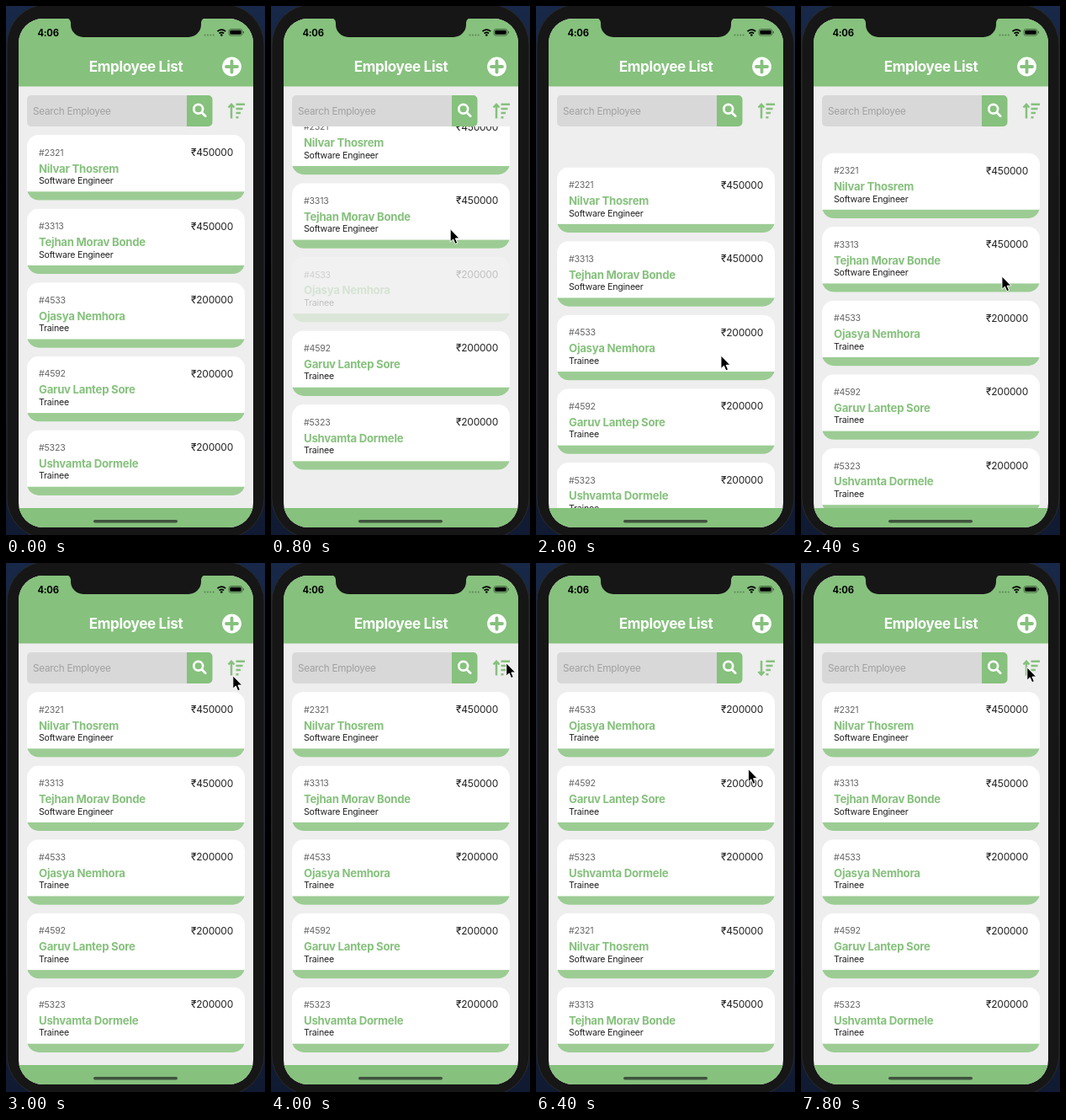
Write an HTML page that moves like this. It is 308 px wide and 628 px high and loops after 8000 ms.

```html
<!DOCTYPE html>
<html lang="en">
<head>
<meta charset="utf-8">
<title>Employee list</title>
<style>
  html, body { margin: 0; width: 100%; height: 100%; overflow: hidden; background: #141d33; }
  svg { display: block; width: 100%; height: 100%; }
  text { font-family: Inter, "Noto Sans", sans-serif; letter-spacing: -.02em; }
  .green { fill: #86c17d; }
  .title { font-size: 17.1px; font-weight: 700; fill: #fff; text-anchor: middle; }
  .time { font-size: 11.2px; font-weight: 700; }
  .hint { font-size: 11.7px; fill: #a0a0a0; }
  .id { font-size: 10.6px; fill: #666; }
  .name { font-size: 13.2px; font-weight: 700; fill: #86c17d; }
  .role { font-size: 10.6px; fill: #222; }
  .pay { font-size: 12px; fill: #222; text-anchor: end; }
</style>
</head>
<body>
<svg viewBox="0 0 308 628">
  <defs>
    <linearGradient id="wall" x2="0" y2="1">
      <stop stop-color="#172848"/><stop offset="1" stop-color="#101b33"/>
    </linearGradient>
    <clipPath id="screen"><rect x="15" y="15" width="279" height="604" rx="29"/></clipPath>
    <clipPath id="viewport"><rect x="15" y="143" width="279" height="453"/></clipPath>
    <clipPath id="cardShape"><rect x="25" width="259" height="77.5" rx="14"/></clipPath>
  </defs>

  <rect width="308" height="628" fill="url(#wall)"/>
  <rect x="1" y="-2" width="306" height="634" rx="48" fill="#161616" stroke="#2a2a2c"/>

  <g clip-path="url(#screen)">
    <rect x="15" y="15" width="279" height="604" fill="#eee"/>
    <rect class="green" x="15" y="15" width="279" height="80.5"/>
    <g clip-path="url(#viewport)"><g id="list"></g></g>
    <rect class="green" x="15" y="596" width="279" height="24"/>
    <rect x="104" y="610" width="100" height="3.4" rx="1.7" fill="#3f533d"/>
  </g>
  <path d="M71 14a6 6 0 0 1 6 6v2a15 15 0 0 0 15 15H217a15 15 0 0 0 15-15v-2a6 6 0 0 1 6-6z" fill="#161616"/>

  <!-- status bar -->
  <text class="time" x="37.5" y="35.5">4:06</text>
  <path d="M236.5 34.5h11" stroke="#5c8756" stroke-width="2" stroke-linecap="round" stroke-dasharray="0 3.4"/>
  <g fill="none" stroke="#000" stroke-width="1.8">
    <path d="M251.5 30.2a6.6 6.6 0 0 1 9.6 0M253.6 32.6a3.8 3.8 0 0 1 5.4 0"/>
    <rect x="265" y="27.5" width="16" height="7.6" rx="2.4" stroke="#456b40" stroke-width="1"/>
  </g>
  <circle cx="256.3" cy="34.5" r="1.3"/>
  <rect x="266.3" y="28.8" width="13.4" height="5" rx="1.2"/>
  <path d="M282.4 30v2.6" stroke="#456b40" stroke-width="1.2"/>

  <!-- header and search -->
  <text class="title" x="154.5" y="78">Employee List</text>
  <circle cx="268.5" cy="72" r="11.4" fill="#fff"/>
  <path d="M262 72h13M268.5 65.5v13" stroke="#86c17d" stroke-width="3.8" stroke-linecap="round"/>
  <path d="M215 106H30a5 5 0 0 0-5 5v27a5 5 0 0 0 5 5H215z" fill="#d8d8d8"/>
  <path class="green" d="M215 106h25.5a5 5 0 0 1 5 5v27a5 5 0 0 1-5 5H215z"/>
  <text class="hint" x="32" y="128.6">Search Employee</text>
  <g fill="none" stroke="#fff" stroke-width="2.7" stroke-linecap="round">
    <circle cx="228.7" cy="122.3" r="5.4"/><path d="M232.9 126.5l4.3 4.3"/>
  </g>

  <!-- sort control -->
  <g fill="none" stroke="#86c17d" stroke-width="2.5">
    <path d="M273.5 116.8H284M273.5 122H281.5M273.5 127.1H279M273.5 132.2H276.5"/>
    <path id="arrow" d="M268 133.5V117.5M264.5 120.5l3.5-3.7l3.5 3.7"/>
  </g>

  <g id="cursor">
    <path d="M.8.8v15.500l3.500-3.200 2.400 5.600 2.700-1.200-2.400-5.400h4.800z"
          stroke="#fff" stroke-linejoin="round"/>
  </g>
</svg>
<script>
const DURATION = 8000, STEP = 200;
const LIST_TOP = 153, LIST_HEIGHT = 453, PITCH = 87.6;
const PRESSED_CARD = 2, PRESSED_OPACITY = .22;

const employees = [
  { id: 2321, name: "Nilvar Thosrem", role: "Software Engineer", pay: 450000 },
  { id: 3313, name: "Tejhan Morav Bonde", role: "Software Engineer", pay: 450000 },
  { id: 4533, name: "Ojasya Nemhora", role: "Trainee", pay: 200000 },
  { id: 4592, name: "Garuv Lantep Sore", role: "Trainee", pay: 200000 },
  { id: 5323, name: "Ushvamta Dormele", role: "Trainee", pay: 200000 },
];

// Where the pointer turns or rests
const stops = [
  { at: 200, x: 290, y: 470 },
  { at: 600, x: 207, y: 335 },
  { at: 1400, x: 221, y: 149 },
  { at: 2200, x: 219, y: 436 },
  { at: 3000, x: 269, y: 133 },
  { at: 3600, x: 286, y: 122 },
  { at: 4600, x: 274, y: 115 },
  { at: 5200, x: 274, y: 115 },
  { at: 6000, x: 212, y: 535 },
  { at: 6800, x: 268, y: 123 },
];
const drags = [{ press: 633, release: 1000 }, { press: 1765, release: 2200 }];
const sortClicks = [4200, 7200];

const clamp = value => Math.min(1, Math.max(0, value));
const easeOut = part => Math.sin(clamp(part) * Math.PI / 2);

function pointerAt(time) {
  const next = Math.max(1, stops.findIndex(stop => stop.at > time));
  const last = stops[stops.length - 1];
  if (time >= last.at) return last;
  const from = stops[next - 1], to = stops[next];
  const part = easeOut((time - from.at) / (to.at - from.at));
  return { x: from.x + (to.x - from.x) * part, y: from.y + (to.y - from.y) * part };
}

// Overscroll resists the drag, then springs back on release
const rubberBand = distance =>
  .55 * distance / (.55 * Math.abs(distance) / LIST_HEIGHT + 1);

function scrollAt(time) {
  return drags.reduce((offset, { press, release }) => {
    if (time < press) return offset;
    const pulled = pointerAt(Math.min(time, release)).y - pointerAt(press).y;
    return offset + rubberBand(pulled) * (1 - clamp((time - release) / 600)) ** 2;
  }, 0);
}

function pressOpacity(time) {
  const pressed = time < drags[0].press ? 0 : clamp((1200 - time) / 400);
  return 1 - (1 - PRESSED_OPACITY) * pressed;
}

const byId = id => document.getElementById(id);
const list = byId("list"), cursor = byId("cursor"), arrow = byId("arrow");

list.innerHTML = employees.map(({ id, name, role, pay }) => `<g>
  <g clip-path="url(#cardShape)">
    <rect x="25" width="259" height="78" fill="#fff"/>
    <rect x="25" y="67.3" width="259" height="11" fill="#9ccc94"/>
  </g>
  <text class="id" x="39" y="24.7">#${id}</text>
  <text class="pay" x="270" y="25">₹${pay}</text>
  <text class="name" x="39" y="44.5">${name}</text>
  <text class="role" x="39" y="58">${role}</text>
</g>`).join("");
employees.forEach((employee, i) => employee.card = list.children[i]);

const highestFirst = [...employees].sort((a, b) => b.pay - a.pay);
const lowestFirst = [...employees].sort((a, b) => a.pay - b.pay);

function draw() {
  const time = Math.floor(performance.now() % DURATION / STEP) * STEP;
  const ascending = time >= sortClicks[0] && time < sortClicks[1];
  const top = LIST_TOP + scrollAt(time);
  const { x, y } = pointerAt(time);

  (ascending ? lowestFirst : highestFirst).forEach(({ card }, row) =>
    card.setAttribute("transform", `translate(0 ${top + row * PITCH})`));
  employees[PRESSED_CARD].card.setAttribute("opacity", pressOpacity(time));
  arrow.setAttribute("transform", ascending ? "matrix(1 0 0 -1 0 249.5)" : "");
  cursor.setAttribute("transform", `translate(${x} ${y})`);
  cursor.setAttribute("visibility", time < stops[0].at ? "hidden" : "visible");
  requestAnimationFrame(draw);
}
draw();
</script>
</body>
</html>
```
